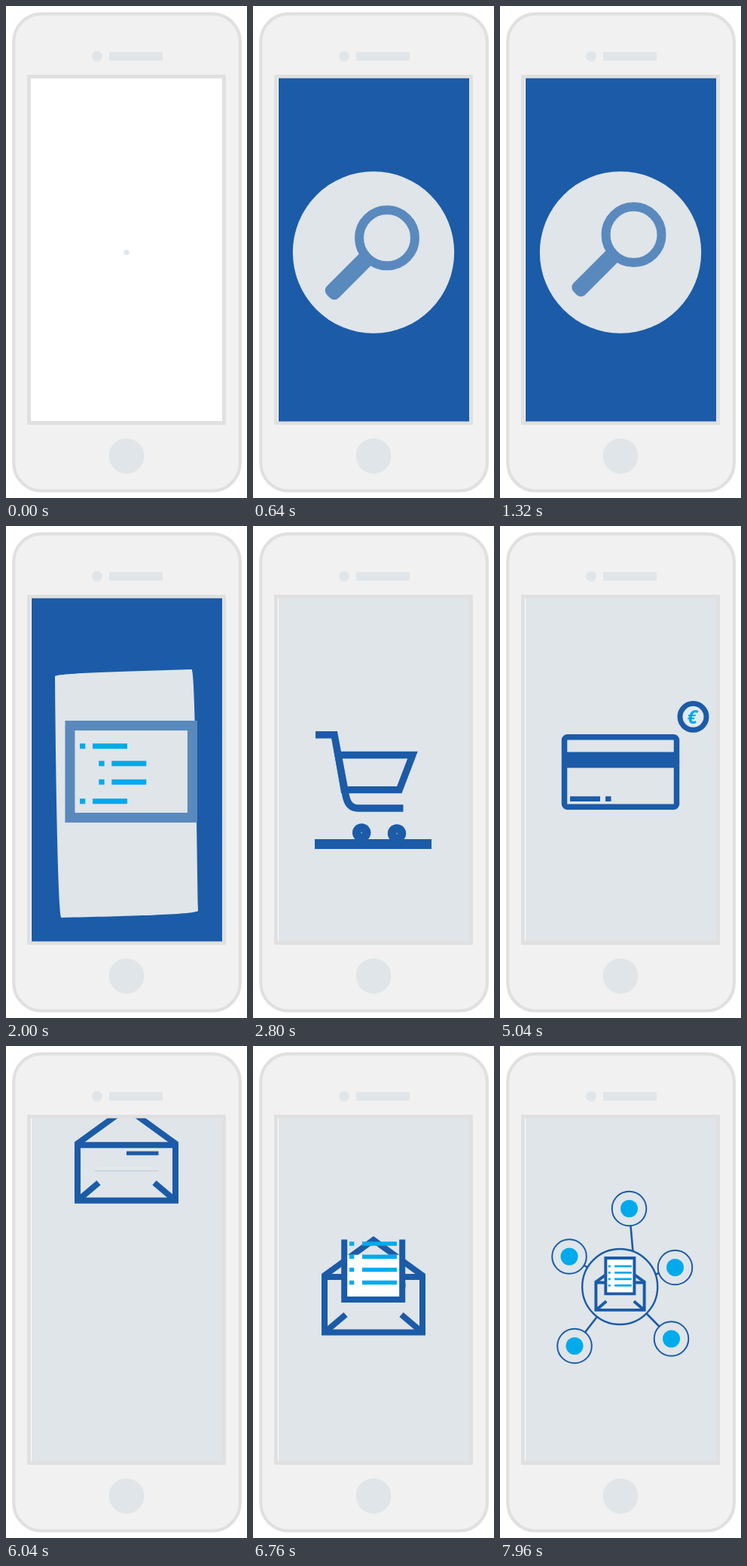
An HTML page with a canvas that plays this animation: 320 px wide and 652 px high, repeating every 8000 ms.

```html
<!DOCTYPE html>
<html lang="en">
<head>
<meta charset="utf-8">
<title>Mobile shopping</title>
<style>
html, body { margin: 0; width: 100%; height: 100%; overflow: hidden; background: #fff; }
canvas { display: block; width: 320px; height: 652px; }
</style>
</head>
<body>
<canvas></canvas>
<script>
const LOOP = 8000;
const BLUE = '#1b5ba8', CYAN = '#00aaeb', MIST = '#dfe5e9', LENS = '#5a89be', EDGE = '#e0e0e0';
const canvas = document.querySelector('canvas');
const ctx = canvas.getContext('2d');
const dpr = window.devicePixelRatio || 1;
canvas.width = 320 * dpr;
canvas.height = 652 * dpr;

const linear = p => p;
const easeIn = p => p * p * p;
const easeOut = p => 1 - (1 - p) ** 3;
const easeInOut = p => p * p * (3 - 2 * p);
const easeBack = p => 1 + 2.7 * (p - 1) ** 3 + 1.7 * (p - 1) ** 2;
const lerp = (a, b, p) => a + (b - a) * p;
const span = (t, from, to, ease = easeInOut) =>
  ease(Math.min(1, Math.max(0, (t - from) / (to - from))));

function paint(fill, stroke, width) {
  if (fill) { ctx.fillStyle = fill; ctx.fill(); }
  if (stroke) { ctx.strokeStyle = stroke; ctx.lineWidth = width; ctx.stroke(); }
}
function circle(x, y, r, fill, stroke, width) {
  ctx.beginPath();
  ctx.arc(x, y, Math.max(0, r), 0, 2 * Math.PI);
  paint(fill, stroke, width);
}
function box(x, y, w, h, fill, stroke, width, radius = 0) {
  ctx.beginPath();
  if (radius) ctx.roundRect(x, y, w, h, radius);
  else ctx.rect(x, y, w, h);
  paint(fill, stroke, width);
}
function line(points, width, color = BLUE, closed = false) {
  ctx.beginPath();
  points.forEach(([x, y]) => ctx.lineTo(x, y));
  if (closed) ctx.closePath();
  paint(null, color, width);
}
function group(draw, x = 0, y = 0, scale = 1, px = 0, py = 0, angle = 0) {
  if (scale <= 0) return;
  ctx.save();
  ctx.translate(px + x, py + y);
  ctx.rotate(angle);
  ctx.scale(scale, scale);
  ctx.translate(-px, -py);
  draw();
  ctx.restore();
}
function clipBox(x, y, w, h, draw) {
  ctx.save();
  ctx.beginPath();
  ctx.rect(x, y, w, h);
  ctx.clip();
  draw();
  ctx.restore();
}
function listRow(x, y, bullet, barX, barW, h) {
  box(x, y - h / 2, bullet, h, CYAN);
  box(barX, y - h / 2, barW, h, CYAN);
}

function phone() {
  box(10.3, 10.3, 300.6, 632.2, '#f1f1f1', EDGE, 4.2, 37);
  circle(121, 66.8, 7, MIST);
  box(137, 61, 71, 11.5, MIST);
  box(30.5, 93.5, 259, 459, '#fff', EDGE, 5);
  circle(160, 596.3, 23.4, MIST);
}

// Sheet outlines: four cubic sides, listed clockwise as anchor, control, control.
const roundSheet = [0, 1, 2, 3].flatMap(i => {
  const c = Math.round(Math.cos(i * Math.PI / 2)), s = Math.round(Math.sin(i * Math.PI / 2));
  return [[-75.8, -75.8], [-34, -117.6], [34, -117.6]]
    .map(([x, y]) => [160 + x * c - y * s, 326.5 + x * s + y * c]);
});
const bentSheet = [
  [65, 199], [70, 195], [160, 192.5], [246.5, 190], [251, 194], [252.5, 350],
  [255, 510], [250, 515], [160, 517], [73.5, 519], [69, 515], [66, 330]
];
const fullSheet = [
  [30, 90], [115, 90], [205, 90], [290, 90], [290, 245], [290, 400],
  [290, 555], [205, 555], [115, 555], [30, 555], [30, 400], [30, 245]
];
function sheet(t) {
  const first = t < 2000;
  const p = first ? span(t, 1560, 2000) : span(t, 2040, 2440, easeIn);
  const from = first ? roundSheet : bentSheet, to = first ? bentSheet : fullSheet;
  const pts = from.map(([x, y], i) => [lerp(x, to[i][0], p), lerp(y, to[i][1], p)]);
  ctx.beginPath();
  ctx.moveTo(...pts[0]);
  for (let i = 0; i < 12; i += 3) {
    ctx.bezierCurveTo(...pts[i + 1], ...pts[i + 2], ...pts[(i + 3) % 12]);
  }
  paint(MIST);
}

function magnifier(t) {
  const p = span(t, 1480, 1880);
  const handle = lerp(110, 43, span(t, 1400, 1600));
  if (handle > 44) {
    group(() => box(38, -11, handle - 38, 22, LENS, null, 0, [0, 8, 8, 0]),
      178, 307, 1, 0, 0, Math.PI * 0.75);
  }
  const w = lerp(74, 162.5, p), h = lerp(74, 122, p);
  box(lerp(178, 166.2, p) - w / 2, lerp(307.3, 325.5, p) - h / 2, w, h,
    null, LENS, lerp(12, 13, p), lerp(37, 0, p));
}

function search(t) {
  circle(160, 326.5, 275 * span(t, 80, 480), BLUE);
  if (t < 1560) circle(160, 326.5, lerp(3.5, 107.2, span(t, 40, 560, easeBack)), MIST);
  else sheet(t);
  const orbit = 2 * Math.PI * span(t, 720, 1400);
  const gone = span(t, 2120, 2440, easeIn);
  group(() => {
    magnifier(t);
    [[0, 291.7], [25.3, 314.7], [25.3, 339.3], [0, 364.7]].forEach(([indent, y], i) => {
      const grow = span(t, 1720 + i * 50, 1840 + i * 50, easeOut);
      if (grow) listRow(98 + indent, y, 7.3 * Math.min(1, grow * 3), 115 + indent, 46 * grow, 7);
    });
  }, 18 * (Math.cos(orbit) - 1), 18 * Math.sin(orbit),
  span(t, 360, 600, easeBack) * (1 - gone), 160, 326);
}

function cart(t) {
  const ground = span(t, 2560, 2760) * (1 - span(t, 4040, 4280));
  box(159.5 - 77.5 * ground, 415, 155 * ground, 13, BLUE);
  const drop = -330 * (1 - span(t, 2560, 2840, easeBack));
  const drive = -13 * span(t, 3800, 3960) + 260 * span(t, 3960, 4280, easeIn);
  group(() => {
    if (t >= 3120) {
      group(() => {
        box(129.7, 250.7, 64.3, 84, '#e2e7ec', BLUE, 7);
        [270.8, 285.2, 300, 314.2].forEach(y => listRow(135, y, 5.5, 149, 39, 4.8));
      }, 0, -245 * (1 - span(t, 3120, 3480, easeBack)));
    }
    ctx.beginPath();
    ctx.moveTo(83, 268.3);
    ctx.lineTo(108, 268.3);
    ctx.lineTo(123, 348);
    ctx.quadraticCurveTo(126, 365.5, 139, 365.5);
    ctx.lineTo(199.5, 365.5);
    paint(null, BLUE, 9.5);
    line([[113, 295], [212, 295], [194.3, 341.2], [121, 341.2]], 9.3, BLUE, true);
    [[144.2, 398], [191, 399]].forEach(([x, y]) => {
      circle(x, y, 12.2, BLUE);
      circle(x, y, 0.9, '#9aa9c4');
    });
  }, drive, drop);
}

function coin(t) {
  const p = span(t, 4840, 5040, easeOut), fall = span(t, 5400, 5560, easeIn);
  const angle = Math.PI * span(t, 5040, 5400, linear);
  const x = t < 5040 ? lerp(205, 256.5, p) : lerp(166.8 + 89.7 * Math.cos(angle), 115, fall);
  const y = t < 5040 ? lerp(326, 254, p) : lerp(254 - 134 * Math.sin(angle), 326, fall);
  circle(x, y, 17.5, '#e4e9ed', BLUE, 7);
  ctx.fillStyle = CYAN;
  ctx.font = 'italic bold 25px "Open Sans", sans-serif';
  ctx.textAlign = 'center';
  ctx.fillText('€', x - 1, y + 9);
}

function payment(t) {
  const enter = span(t, 4240, 4680, easeBack), leave = span(t, 5640, 5960, easeIn);
  group(() => {
    if (t > 4840 && t < 5560) coin(t);
    box(85.5, 279.7, 149, 92.5, MIST, BLUE, 7.5, 4);
    box(82, 299.5, 156, 21, BLUE);
    box(93, 358.3, 40, 6.7, BLUE);
    box(140, 358.3, 7.5, 6.7, BLUE);
  }, -230 * (1 - enter), 290 * leave);
}

function envelope(t) {
  line([[95, 304], [160, 257], [225, 304], [225, 379.5], [95, 379.5]], 8, BLUE, true);
  line([[95, 306], [225, 306]], 8);
  line([[97, 378], [123, 356]], 8);
  line([[223, 378], [197, 356]], 8);
  const edge = lerp(340, 236, span(t, 6520, 6820, linear));
  const fill = lerp(336, 236, span(t, 6540, 6913, linear));
  clipBox(110, fill, 100, 340 - fill, () => box(121, 240, 77, 96, '#fff'));
  clipBox(110, edge, 100, 345 - edge, () => box(121.2, 240, 77, 96, null, BLUE, 8));
  [313.6, 296.6, 279.2, 262].forEach((y, i) => {
    const grow = span(t, 6520 + i * 50, 6600 + i * 50, easeOut);
    if (grow) listRow(128, y, 6.3, 145, 46 * grow, 5.5);
  });
}

const NET = 0.494;
const nodes = [[12, -103.5], [73, -25.5], [68, 69], [-60.5, 78.5], [-67.5, -40]];
function network(t) {
  nodes.forEach(([x, y], i) => {
    const p = span(t, 7340 + i * 40, 7660 + i * 40, easeBack);
    if (!p) return;
    line([[i ? 0 : 21, 0], [x * p, y * p]], 2.6);
    circle(x * p, y * p, 22.8 * Math.min(1, p), MIST, BLUE, 2);
    circle(x * p, y * p, 11.5 * Math.min(1, p), CYAN);
  });
  const sweep = span(t, 7000, 7280);
  if (!sweep) return;
  circle(-0.3, 0, 50, MIST);
  ctx.beginPath();
  ctx.arc(-0.3, 0, 50, -Math.PI / 2, -Math.PI / 2 + 2 * Math.PI * sweep);
  paint(null, BLUE, 2.4);
}

function mail(t) {
  const zoom = span(t, 7280, 7760);
  group(() => {
    group(() => network(t), 160, 317, 1 / NET);
    envelope(t);
  }, -0.5 * zoom, 2 * zoom - 300 * (1 - span(t, 6000, 6400, easeBack)),
  lerp(1, NET, zoom), 160, 317);
}

function draw(t) {
  ctx.setTransform(dpr, 0, 0, dpr, 0, 0);
  ctx.fillStyle = '#fff';
  ctx.fillRect(0, 0, 320, 652);
  phone();
  clipBox(34, 95.7, 253, 454.8, () => {
    if (t < 2480) search(t);
    else box(34, 95, 253, 456, MIST);
    if (t >= 2560 && t < 4280) cart(t);
    if (t >= 4240 && t < 5960) payment(t);
    if (t >= 6000) mail(t);
  });
}

function tick(now) {
  draw(now % LOOP);
  requestAnimationFrame(tick);
}
draw(0);
requestAnimationFrame(tick);
</script>
</body>
</html>
```
